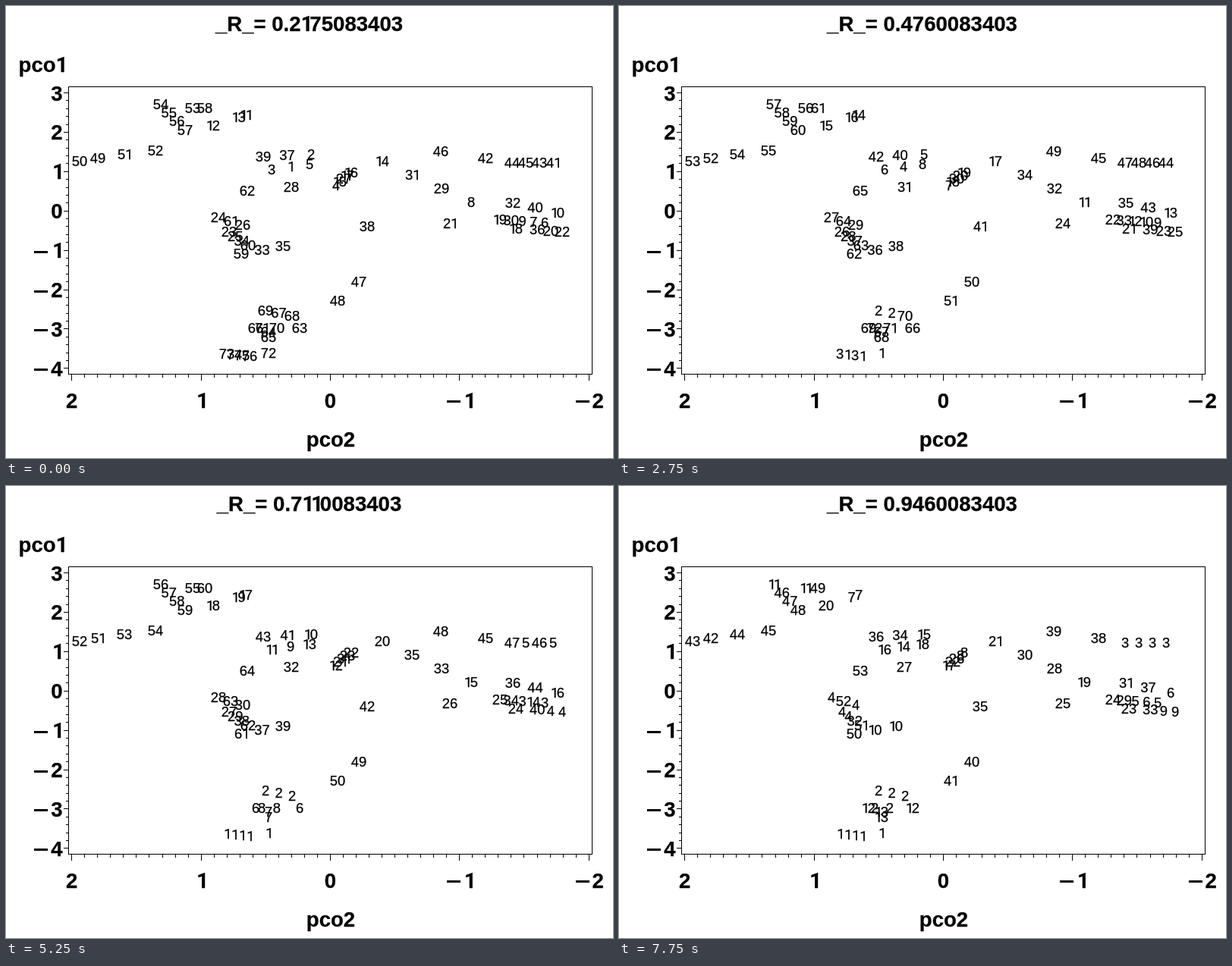
An HTML page that plays this animation: 800 by 596 pixels, repeating every 8 s.

```html
<!DOCTYPE html>
<html lang="en">
<head>
<meta charset="utf-8">
<title>Cluster scatter</title>
<style>
  html, body { margin: 0; width: 100%; height: 100%; overflow: hidden; background: #fff; }
  svg { display: block; }
  text {
    font: 18.4px "Liberation Sans", Arial, sans-serif; font-kerning: none;
    text-anchor: middle; white-space: pre; stroke: #000; stroke-width: .25px;
  }
  .big { font-size: 27.6px; font-weight: bold; }
  .one { font-family: Roboto, sans-serif; letter-spacing: -0.15em; }
  path { fill: none; stroke: #000; shape-rendering: crispEdges; }
</style>
</head>
<body>
<svg id="plot" width="800" height="596" viewBox="0 0 800 596"></svg>
<script>
const STEP = 250, STEPS = 32;
const plot = document.getElementById('plot');
const points = [];

// Spreads the given observations along a line; ease shifts them towards an end
function strand(ids, [x0, y0], [x1, y1], ease = 1) {
  ids.forEach((id, i) => {
    const t = (i / (ids.length - 1)) ** ease;
    points[id - 1] = { x: x0 + (x1 - x0) * t, y: y0 + (y1 - y0) * t };
  });
}

// Upper left
strand([50, 49, 51, 52], [97, 204], [197, 190], 1.3);
strand([54, 55, 56, 57], [204, 129], [236, 163]);
strand([53, 58], [246, 134], [262, 134]);
strand([12, 13, 11], [273, 157], [316, 143], 0.35);
// Upper middle
strand([39, 37, 2], [339, 198], [402, 195]);
strand([3, 1, 5], [350, 215], [400, 208]);
strand([62, 28], [318, 243], [376, 238]);
strand([4, 15, 27, 17, 16], [435, 236], [455, 219]);
strand([14, 31, 29, 8], [496, 204], [613, 258]);
// Right
strand([46, 42], [573, 191], [632, 200]);
strand([44, 45, 43, 41], [667, 206], [721, 206]);
strand([32, 40, 10], [668, 259], [727, 272]);
strand([19, 30, 9, 7, 6], [651, 281], [710, 285]);
strand([18, 36, 20, 22], [672, 293], [733, 297], 0.7);
strand([38, 21], [476, 290], [585, 286]);
strand([47, 48], [465, 363], [437, 388]);
// Lower left
strand([24, 61, 26], [280, 278], [312, 288]);
strand([23, 25, 34, 60], [294, 297], [319, 315]);
strand([59, 33, 35], [310, 326], [365, 316]);
strand([69, 67, 68], [342, 401], [377, 408]);
strand([66, 71, 70, 63], [329, 424], [387, 424], 1.8);
strand([64, 65, 72], [346, 429], [346, 457], 2);
strand([73, 74, 75, 76], [291, 458], [321, 461]);

// Order in which clusters merge
const joins = [
  [74, 76], [72, 74], [73, 75], [67, 69], [64, 65], [70, 71], [63, 66], [6, 9],
  [72, 73], [20, 22], [67, 68], [41, 45], [16, 17], [53, 54], [7, 10], [25, 26],
  [41, 43], [67, 70], [41, 44], [11, 13], [33, 35], [23, 24], [23, 25]
];

// Merging speeds up with the threshold
const joinCount = step => Math.min(step, 2) + Math.floor((step / 6.53) ** 2);

// Large clusters are numbered first, then pairs, then single points
function byCluster(p, q) {
  const a = p.length, b = q.length;
  if (a > 2 || b > 2) return b - a || q[0] - p[0];
  return b - a || p[0] - q[0];
}

function labelsAt(step) {
  let groups = points.map((_, i) => [i + 1]);
  for (const [a, b] of joins.slice(0, joinCount(step))) {
    const ga = groups.find(g => g.includes(a)), gb = groups.find(g => g.includes(b));
    ga.push(...gb);
    groups = groups.filter(g => g !== gb);
  }
  const labels = [];
  groups.sort(byCluster).forEach((g, n) => g.forEach(id => { labels[id - 1] = n + 1; }));
  return labels;
}

function add(tag, attrs) {
  const el = document.createElementNS('http://www.w3.org/2000/svg', tag);
  for (const k in attrs) el.setAttribute(k, attrs[k]);
  return plot.appendChild(el);
}

// The digit 1 is set narrower than the others
function write(el, value) {
  el.innerHTML = String(value).replace(/1/g, '<tspan class="one">1</tspan>');
}

function big(x, y, value) {
  const el = add('text', { x, y, class: 'big' });
  write(el, value);
  return el;
}

function minus(x, y) {
  add('path', { d: `M${x - 9} ${y}h18`, 'stroke-width': 3 });
}

function drawAxes() {
  const xAt = i => 87.27 + i * 17.0345, yAt = i => 115 + i * 10.38;
  let d = 'M82.5 106.5H772.5V485.5H82.5Z';
  for (let i = 0; i <= 40; i++) d += `M${Math.round(xAt(i)) - 0.5} 486v${i % 10 ? 4 : 8}`;
  for (let i = 0; i <= 35; i++) d += `M82 ${Math.round(yAt(i)) - 0.5}h${i % 5 ? -3 : -6}`;
  add('path', { d });
  for (let v = 2; v >= -2; v--) {
    const x = xAt(20 - v * 10) - 0.5;
    big(v < 0 ? x + 12 : x, 529.5, Math.abs(v));
    if (v < 0) minus(Math.round(x) - 8, 521.5);
  }
  for (let v = 3; v >= -4; v--) {
    const y = yAt(15 - v * 5);
    big(67, y + 9.5, Math.abs(v));
    if (v < 0) minus(46, Math.round(y) + 1.5);
  }
  big(47, 87, 'pco1');
  big(428, 581, 'pco2');
}

drawAxes();
const title = big(399.5, 32.5, '');
const marks = points.map(({ x, y }) => add('text', { x, y: y + 6.5 }));
const labels = Array.from({ length: STEPS }, (_, k) => labelsAt(k));

let shown = -1;
function show(step) {
  if (step === shown) return;
  shown = step;
  write(title, '_R_= ' + (0.2175083403 + step * 0.0235).toFixed(10));
  marks.forEach((m, i) => write(m, labels[step][i]));
}

const start = performance.now();
function tick() {
  show(Math.floor((performance.now() - start) / STEP) % STEPS);
  requestAnimationFrame(tick);
}
tick();
</script>
</body>
</html>
```
